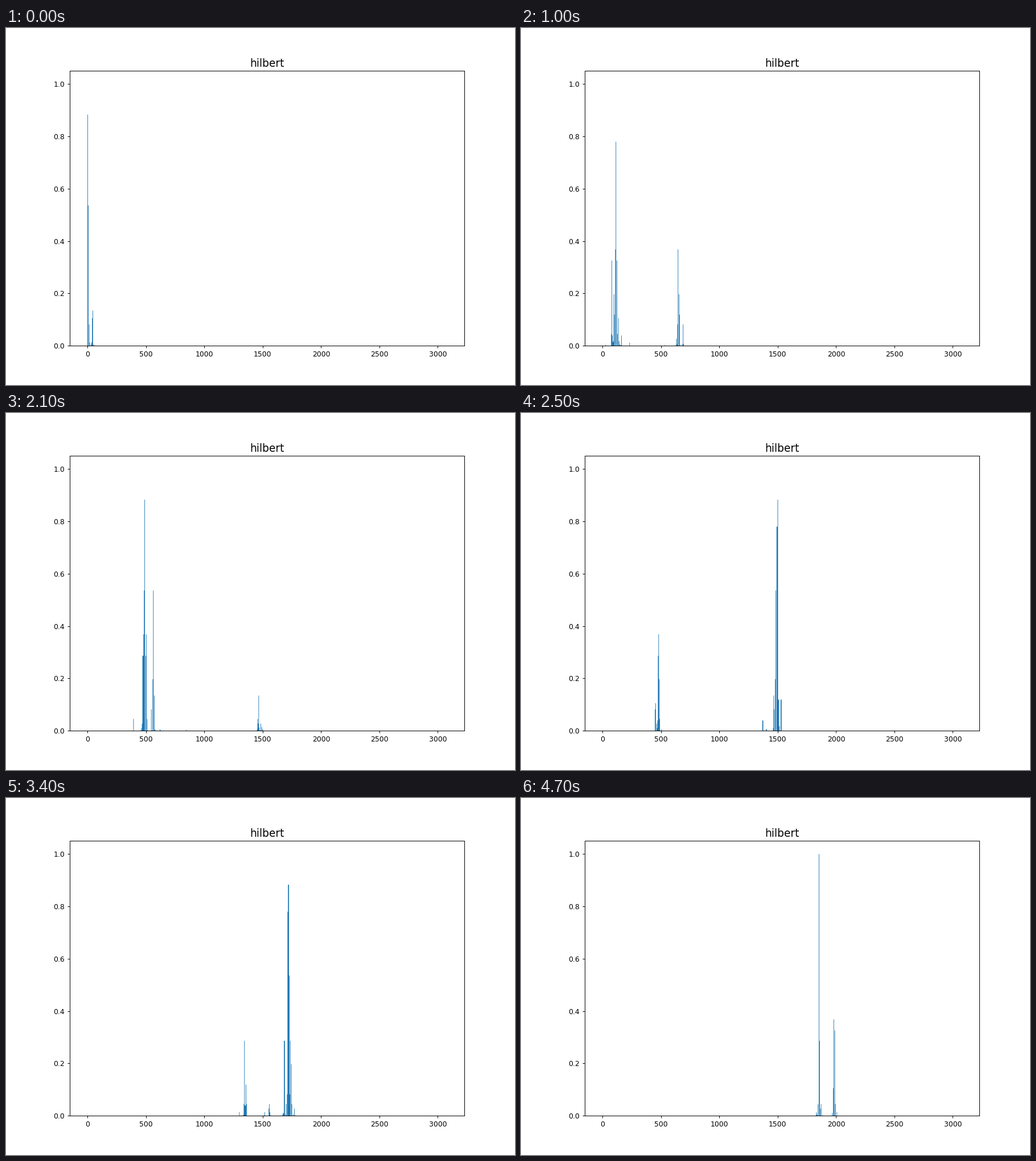
Write a matplotlib script that moves like this. It is 894 px wide and 626 px high and loops after 4.8 s.

```python
import numpy as np
import matplotlib.pyplot as plt
from matplotlib.animation import FuncAnimation

W, H = 894, 626
DPI = 64
K = 89.4 / DPI          # scale for point sizes
COLS, ROWS = 64, 48
FRAMES = 48
SIGMA = 2.0


def gilbert(p, a, b):
    """Walk a rectangle spanned by a and b along a generalised Hilbert curve."""
    w, h = abs(a.sum()), abs(b.sum())
    da, db = np.sign(a), np.sign(b)
    if h == 1:
        for i in range(w):
            yield p + i * da
        return
    if w == 1:
        for i in range(h):
            yield p + i * db
        return
    a2, b2 = a // 2, b // 2
    if 2 * w > 3 * h:
        if abs(a2.sum()) % 2 and w > 2:
            a2 = a2 + da
        yield from gilbert(p, a2, b)
        yield from gilbert(p + a2, a - a2, b)
    else:
        if abs(b2.sum()) % 2 and h > 2:
            b2 = b2 + db
        yield from gilbert(p, b2, a2)
        yield from gilbert(p + b2, a, b - b2)
        yield from gilbert(p + a - da + b2 - db, -b2, a2 - a)


cells = np.array(list(gilbert(np.array([0, 0]), np.array([COLS, 0]),
                              np.array([0, ROWS]))))
n = len(cells)

# Thin bars land on a 775 x 539 raster: each column shows at most one bar.
RASTER_W, RASTER_H = 775, 539
margin = 0.05 * (n - 0.2)
x0, x1 = -0.4 - margin, n - 0.6 + margin
y_top = 1.05
edges = np.linspace(x0, x1, RASTER_W + 1)
mids = (edges[:-1] + edges[1:]) / 2
index = np.rint(mids).astype(int)
shown = (abs(mids - index) < 0.4) & (index >= 0) & (index < n)
column_cells = cells[np.clip(index, 0, n - 1)]


def heights(t):
    d2 = ((column_cells - t) ** 2).sum(axis=1)
    v = np.where(shown, np.exp(-d2 / (2 * SIGMA ** 2)), 0)
    unit = RASTER_H / y_top
    return np.floor(v * unit + 0.5) / unit


plt.rcParams.update({
    "font.family": "DejaVu Sans",
    "font.size": 10 * K,
    "axes.linewidth": 0.8 * K,
    "axes.titlesize": 15 * K,
    "axes.titlepad": 6 * K,
})
for axis in ("xtick", "ytick"):
    plt.rcParams.update({
        f"{axis}.major.size": 3.5 * K,
        f"{axis}.major.width": 0.8 * K,
        f"{axis}.major.pad": 3.5 * K,
    })

fig = plt.figure(figsize=(W / DPI, H / DPI), dpi=DPI, facecolor="white")
ax = fig.add_axes([0.125, 0.11, 0.775, 0.77])
ax.set_title("hilbert")
bars = ax.stairs(heights(0), edges, fill=True, color="#1f77b4", linewidth=0)
bars.set_snap(False)
ax.set_xlim(x0, x1)
ax.set_ylim(0, y_top)
ax.set_xticks(range(0, 3001, 500))
ax.set_yticks(np.arange(6) / 5)


def update(t):
    bars.set_data(values=heights(t))
    return bars,


anim = FuncAnimation(fig, update, frames=FRAMES, interval=100,
                     repeat=True, repeat_delay=0, blit=False)
plt.show()
```
